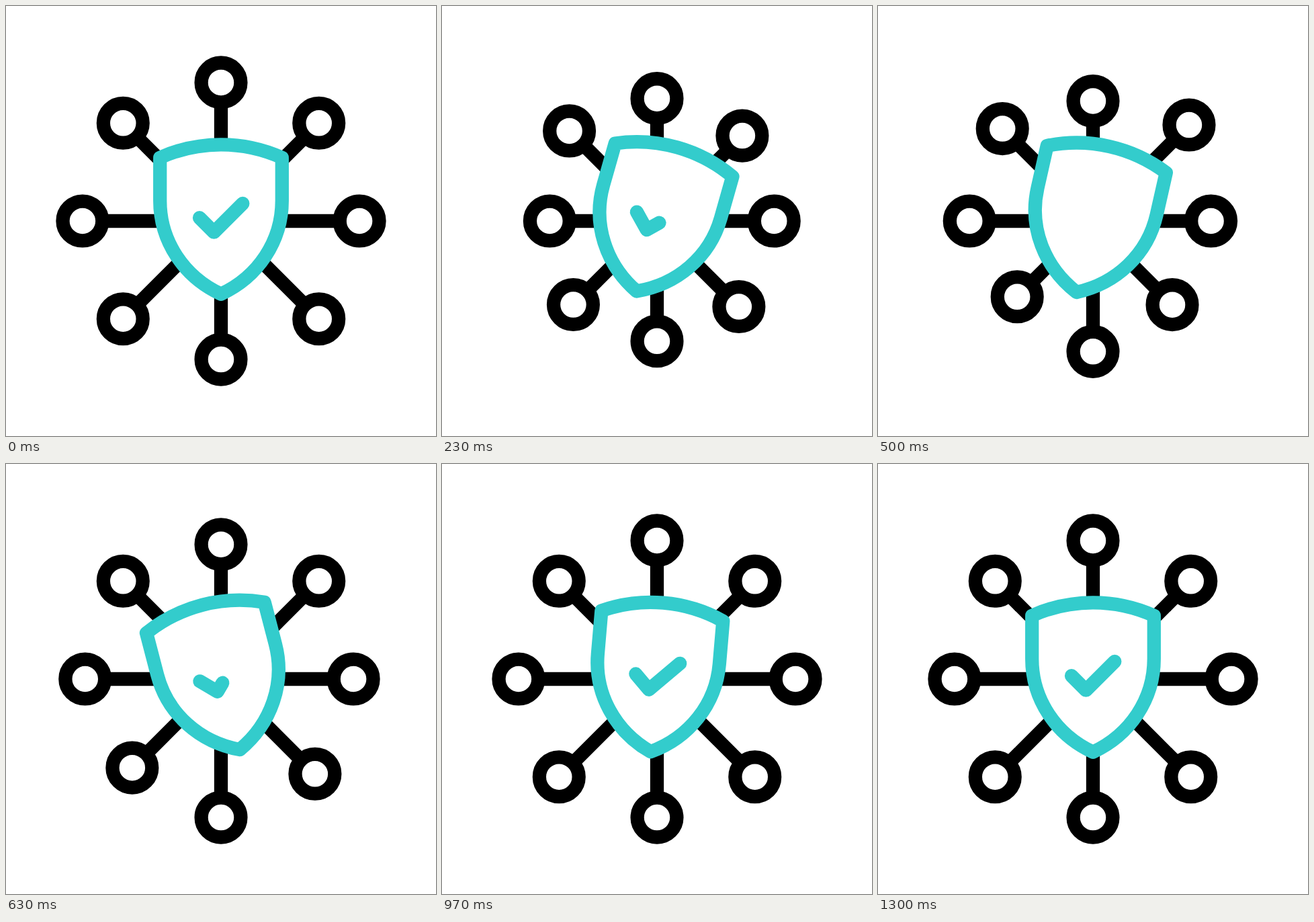
Recreate the animation shown at these times as an HTML page. Size 640 by 640 pixels, loop 1.67 s.

```html
<!DOCTYPE html>
<html lang="en">
<head>
<meta charset="utf-8">
<title>Shield network</title>
<style>
  html, body { margin: 0; width: 100%; height: 100%; overflow: hidden; background: #fff; }
  svg { display: block; width: 100vw; height: 100vh; }
  #nodes { stroke: #000; }
  #shield { stroke: #33cccc; stroke-linecap: round; stroke-linejoin: round; }
</style>
</head>
<body>
<svg viewBox="0 0 640 640" fill="none" stroke-width="20.3">
  <g id="nodes"></g>
  <g id="shield">
    <path fill="#fff" d="M229.2 225.7A222 222 0 0 1 410.8 225.7V290C410.8 350 375.2 403 320 428.7C264.8 403 229.2 350 229.2 290Z"/>
    <path id="check" pathLength="1" d="M288 315.2L309.5 336.7L352.3 294"/>
  </g>
</svg>
<script>
const LOOP = 1670, FPS = 30;
const nodes = document.getElementById('nodes');
const shield = document.getElementById('shield');
const check = document.getElementById('check');

// smooth rise from 0 to 1 between frames a and b
function ease(f, a, b) {
  const x = Math.min(1, Math.max(0, (f - a) / (b - a)));
  return x * x * (3 - 2 * x);
}

function add(parent, tag, attrs = {}) {
  const el = document.createElementNS('http://www.w3.org/2000/svg', tag);
  for (const k in attrs) el.setAttribute(k, attrs[k]);
  return parent.appendChild(el);
}

// one spoke every 45 degrees, clockwise from the right:
// how far it pulls in, the frame it is innermost, the frame it is back
const spokes = [
  [44, 10.7, 22.4], [47, 11.8, 21.4], [35.6, 10.2, 18], [52.5, 12.8, 23.3],
  [48.5, 8, 21.3], [27.5, 11, 19], [37.2, 11.8, 21.4], [27.6, 7.9, 17.2]
].map(([reach, peak, end], i) => {
  const angle = i * Math.PI / 4;
  // the falling diagonal pulls in on a slightly flatter line
  const heading = angle - 0.135 * Math.max(0, Math.sin(2 * angle));
  const el = add(nodes, 'g');
  const arm = add(el, 'g', { transform: `translate(320 320) rotate(${i * 45})` });
  add(arm, 'path', { d: 'M70 0H177' });
  add(arm, 'circle', { cx: 206.1, r: 29.4 });
  return f => {
    const pull = reach * (ease(f, 0, peak) - ease(f, peak, end));
    const x = -pull * Math.cos(heading), y = -pull * Math.sin(heading);
    el.setAttribute('transform', `translate(${x} ${y})`);
  };
});

function drawShield(f) {
  const swing = 25.6 * (ease(f, 0.8, 11.5) - 2 * ease(f, 11.5, 22.2) + ease(f, 22.2, 31));
  const settle = 9.5 * (ease(f, 22.2, 31) - ease(f, 31, 39));
  shield.setAttribute('transform', `rotate(${swing + settle} 320 317.6)`);

  const shown = 1 - ease(f, 2.2, 12.8) + ease(f, 15, 23);
  check.style.display = shown > 0 ? '' : 'none';
  check.setAttribute('stroke-dasharray', shown < 1 ? `${shown} 2` : 'none');
}

const start = performance.now();
function tick() {
  const t = (performance.now() - start) % LOOP;
  // steps fall on 10 ms marks, just ahead of the exact 1/30 s
  const f = Math.floor((t + 4) * FPS / 1000);
  spokes.forEach(move => move(f));
  drawShield(f);
  requestAnimationFrame(tick);
}
tick();
</script>
</body>
</html>
```
